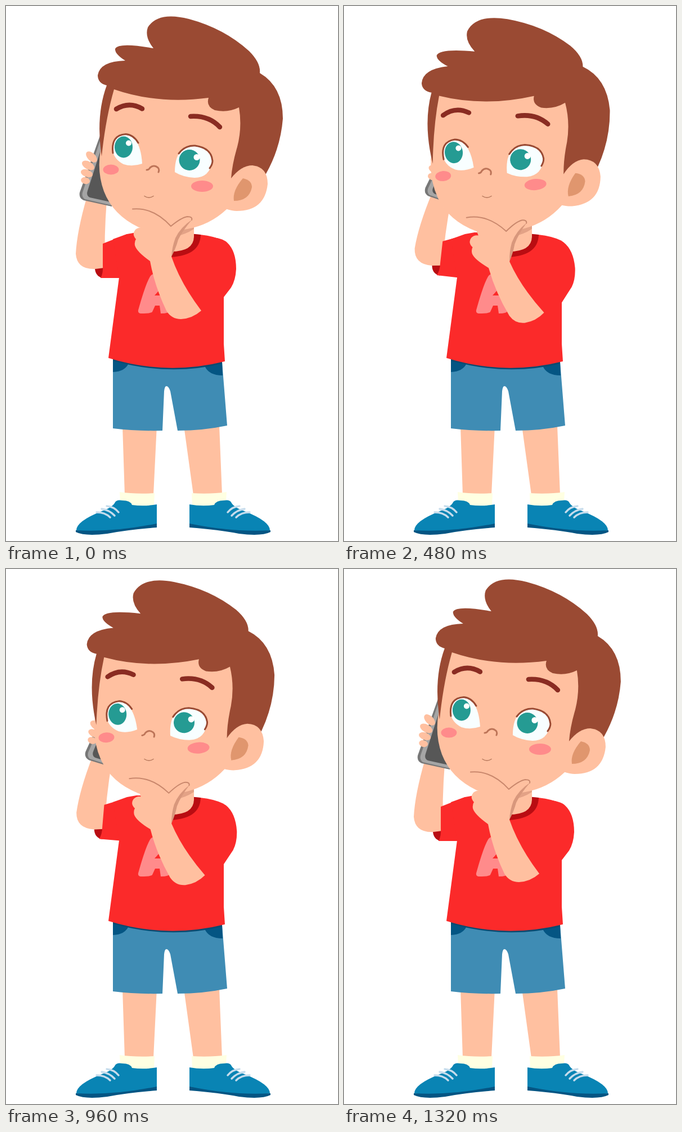
These frames come from a looping animation (590 by 950 pixels, 1350 ms). An HTML page:

```html
<!DOCTYPE html>
<html lang="en">
<head>
<meta charset="utf-8">
<title>Thinking boy on the phone</title>
<style>
  html, body { margin: 0; width: 100%; height: 100%; overflow: hidden; background: #fff; }
  svg { display: block; width: 590px; height: 950px; }
  .skin { fill: #ffc0a0; }
  .hair { fill: #9a4a33; }
  .red { fill: #fb2a2a; }
  .dark-red { fill: #b90d12; }
  .jeans { fill: #3f8cb4; }
  .navy { fill: #045583; }
  .white { fill: #f8feff; }
  .teal { fill: #259b93; }
  .pink { fill: #ff8b8b; }
  .line { fill: none; stroke-linecap: round; stroke-linejoin: round; }
  .brow { stroke: #8a2c22; stroke-width: 8.5; }
  .lash { stroke: #9a4a33; stroke-width: 3; }
  .crease { stroke: #c9876c; stroke-width: 2; }
  .lace { stroke: #c6dcec; stroke-width: 3.5; }
</style>
</head>
<body>
<svg viewBox="0 0 590 950">
  <defs>
    <clipPath id="lids">
      <path id="lidEdge" d="M180 258Q200 276 250 277L290 282Q308 298 378 298V500H180Z"/>
    </clipPath>
    <g id="shoe">
      <path fill="#ffffe2" d="M202 863Q230 867 264 865L263 888H220L203 880Z"/>
      <path fill="#0984b4" d="M268 885Q246 889 224 886Q221 878 207 878Q197 876 194 881Q190 890 170 897Q125 915 125 931Q170 940 268 922Z"/>
      <path class="navy" d="M124 931Q190 935 268 919V926Q215 930 180 937Q140 942 124 934Z"/>
      <path class="line lace" d="M179 888Q192 889 200 899M170 893Q184 895 193 905M161 899Q176 899 185 908"/>
    </g>
  </defs>

  <path class="skin" d="M207 745H268L262 868H211ZM316 745H379L384 868H333Z"/>
  <use href="#shoe"/>
  <use href="#shoe" transform="matrix(-1 0 0 1 594 0)"/>

  <path class="jeans" d="M190 620V750Q232 755 278 754L281 684Q282 675 285 675Q289 675 292 684L305 754Q350 754 393 745L383 620Z"/>
  <path class="navy" d="M190 627L218 634Q212 649 190 650ZM353 639L384 632L385 656Q360 656 353 639Z"/>
  <path fill="#0b4a70" d="M190 622V630Q290 658 384 635V622Z"/>

  <g id="phoneArm">
    <path class="skin" d="M144 338Q126 400 124 440Q126 468 158 467L176 466Q174 410 179 345Z"/>
    <path fill="#777" d="M170 222L131 331Q129 341 138 345L188 356L215 240Z"/>
    <path fill="#a5a5a5" d="M173 222L136 331Q134 339 140 343L188 354L217 240Z"/>
    <path fill="#575757" d="M175 235L145 328Q142 337 149 340L190 349L220 245Z"/>
    <g class="skin">
      <ellipse cx="152" cy="268" rx="12" ry="7" transform="rotate(45 152 268)"/>
      <ellipse cx="146" cy="283" rx="12" ry="7" transform="rotate(30 146 283)"/>
      <ellipse cx="143.500" cy="297" rx="11" ry="6.500" transform="rotate(20 143.500 297)"/>
      <ellipse cx="141" cy="310" rx="8" ry="6" transform="rotate(15 141 310)"/>
    </g>
    <path class="dark-red" d="M158 467L174 465V483Q160 482 158 467Z"/>
    <path class="red" d="M172 422L215 405L240 440L206 483H168Q173 475 172 460Z"/>
  </g>

  <path id="sleeve" class="red" d="M360 410Q385 412 393 420Q409 435 409 467Q408 487 400 500L380 526Z"/>
  <path class="red" d="M190 414L215 405L232 402L345 406Q372 409 387 417V600L389 631Q285 657 182 625L201 482Z"/>
  <path class="pink" d="M235 540Q249 490 257 479Q261 474 277 475L290 541Q291 546 275 546L273 532H265L260 543Q258 546 240 546Q234 546 235 540ZM264 514H276L273 504Z" fill-rule="evenodd"/>
  <path class="dark-red" d="M346 406Q345 446 285 446V400Z"/>
  <path class="skin" d="M240 380H334V410Q333 437 290 436L240 430Z"/>
  <path fill="#e3a286" d="M300 385H334V396Q318 406 302 409Z"/>

  <g id="head">
    <path class="skin" d="M185 135L432 170L412 300Q407 345 392 361Q362 389 322 396Q272 405 236 393Q190 371 174 329Q158 285 173 235Z"/>
    <path class="hair" d="M192 148Q177 200 170 267Q159 195 179 141Q163 137 163 123Q167 98 212 97Q193 85 194 76Q200 64 262 75Q246 55 252 38Q270 9 325 23Q388 40 432 80Q453 101 451 119Q492 143 492 200Q488 252 462 298L430 325L400 306Q402 280 411 250Q420 215 414 180Q394 190 371 185Q355 178 360 163Q270 175 192 148Z"/>
    <path class="skin" d="M400 306Q418 283 438 283Q465 286 465 316Q460 364 410 364Q402 364 390 360Z"/>
    <path fill="#e0966e" d="M421 306Q437 309 437 322Q432 346 405 346Q402 328 421 306Z"/>

    <g clip-path="url(#lids)">
      <path class="white" d="M242 280Q224 286 209 281Q189 271 189 250Q192 229 213 228Q239 232 242 280Z"/>
      <path class="line lash" d="M190 261Q186 229 213 227.500Q227 229 235 243"/>
      <ellipse class="teal" cx="209" cy="250.500" rx="16" ry="19"/>
      <circle cx="218" cy="243.500" r="5" fill="#fff"/>
      <path class="white" d="M300 295Q300 249 334 248Q366 252 367 275Q362 305 335 305Q315 304 300 295Z"/>
      <path class="line lash" d="M307 262Q318 247 336 248Q365 252 367 275Q367 281 362 288"/>
      <circle class="teal" cx="326" cy="273.500" r="18.500"/>
      <circle cx="339" cy="268.500" r="5.500" fill="#fff"/>
    </g>
    <path id="brows" class="line brow" d="M196 183Q219 169 242 182.500M328 196Q360 194 380 215"/>

    <ellipse class="pink" cx="186.500" cy="290.500" rx="14" ry="9"/>
    <ellipse class="pink" cx="348.500" cy="320" rx="19.500" ry="10"/>
    <path class="line" stroke="#bd7458" stroke-width="3" d="M250 291Q254 291 256 287Q263 281 270 287Q273 290 271 295"/>
  </g>
  <path class="line" stroke="#b5765a" stroke-width="1.500" d="M246 337.500Q254 343 262 337.500"/>

  <g id="thinkingArm">
    <path class="skin" d="M224 360Q262 356 293 390Q310 376 322 374Q333 374 330 381Q312 397 304 419Q298 434 294 445Q310 492 347 541Q331 555 311 556Q294 556 285 541Q264 497 256 453Q232 436 229 425Q228 418 231 414Q223 405 230 397Q236 392 243 394Q240 380 224 360Z"/>
    <path class="line crease" d="M225 360.500Q262 357 293 391Q311 376 322 374Q332 374 330 380"/>
    <path fill="#d8977c" d="M331 379Q310 393 301 412Q295 428 294 445Q302 430 306 415Q314 398 331 379Z"/>
  </g>
</svg>
<script>
  const LOOP = 1350, STEP = 30;
  const el = id => document.getElementById(id);
  const turn = (id, angle, x, y) => el(id).setAttribute("transform", `rotate(${angle} ${x} ${y})`);
  const shift = (id, y) => el(id).setAttribute("transform", `translate(0 ${y})`);
  const clamp = v => Math.min(1, Math.max(0, v));

  function draw(now) {
    const t = Math.floor(now % LOOP / STEP) * STEP;
    const sway = (1 - Math.cos(2 * Math.PI * t / LOOP)) / 2;
    const blink = clamp((130 - Math.abs(t - 300)) / 90);

    turn("head", -6.3 * sway, 311, 412);
    turn("thinkingArm", -6.4 * sway, 390, 448);
    turn("sleeve", -6.4 * sway, 390, 448);
    turn("phoneArm", 7.8 * sway, 212, 450);
    shift("brows", 28 * blink);
    shift("lidEdge", -85 * (1 - blink));
    requestAnimationFrame(draw);
  }
  draw(performance.now());
</script>
</body>
</html>
```
